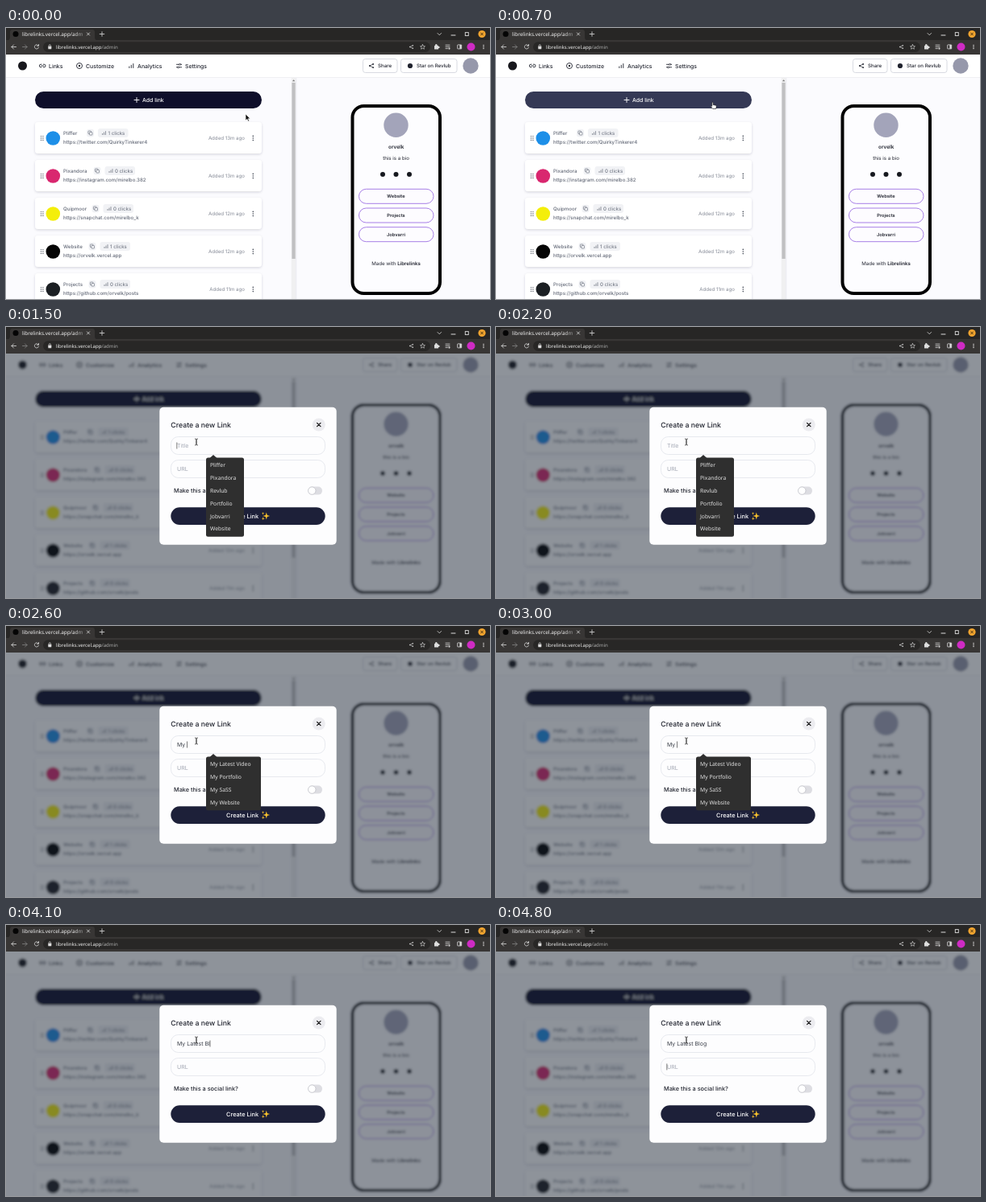
These frames come from a looping animation (600x337 px, 5 s). An HTML page:

```html
<!DOCTYPE html>
<html lang="en">
<head>
<meta charset="utf-8">
<title>Link admin</title>
<style>
  html, body { margin: 0; width: 100%; height: 100%; overflow: hidden; background: #fff; }
  svg { display: block; width: 100%; height: 100%; }
  text { font-family: Inter, sans-serif; text-rendering: geometricPrecision; white-space: pre; }
  .ui { font-family: "Noto Sans", sans-serif; }
</style>
</head>
<body>
<svg id="stage" viewBox="0 0 600 337"></svg>
<script>
const LOOP = 5000, STEP = 100;
const INK = '#20232e', GREY = '#646a78';

const rect = (x, y, w, h, rx, fill, more = '') =>
  `<rect x="${x}" y="${y}" width="${w}" height="${h}" rx="${rx}" fill="${fill}" ${more}/>`;
const dot = (x, y, r, fill, more = '') =>
  `<circle cx="${x}" cy="${y}" r="${r}" fill="${fill}" ${more}/>`;
const text = (x, y, s, size, fill, more = '') =>
  `<text x="${x}" y="${y}" font-size="${size}" fill="${fill}" ${more}>${s}</text>`;
const line = (d, color = INK, w = 0.9, fill = 'none') =>
  `<path d="${d}" fill="${fill}" stroke="${color}" stroke-width="${w}" stroke-linecap="round" stroke-linejoin="round"/>`;
const MEDIUM = 'font-weight="500"', BOLD = 'font-weight="600"', MID = 'text-anchor="middle"';
const outline = (color, w) => `stroke="${color}" stroke-width="${w}"`;

const bars = (x, y, s, color, w) =>
  line(`M${x - s} ${y + s}v${-s * 0.6}M${x} ${y + s}v${-s * 1.3}M${x + s} ${y + s}v${-s * 2}`, color, w);
const shareIcon = (x, y, s, color) =>
  line(`M${x + s} ${y - s}L${x - s} ${y}L${x + s} ${y + s}`, color, 0.7) +
  [[s, -s], [-s, 0], [s, s]].map(([a, b]) => dot(x + a, y + b, s * 0.45, color)).join('');
const cross = (x, y, s, color, w) =>
  line(`M${x - s} ${y - s}l${2 * s} ${2 * s}m0 ${-2 * s}l${-2 * s} ${2 * s}`, color, w);
const kebab = (x, y, gap, r, color) =>
  [-gap, 0, gap].map(d => dot(x, y + d, r, color)).join('');
const sparkle = (x, y, r) => {
  const q = r * 0.22;
  return `<path fill="#fbc52d" d="M${x} ${y - r}L${x + q} ${y - q}L${x + r} ${y}L${x + q} ${y + q}` +
    `L${x} ${y + r}L${x - q} ${y + q}L${x - r} ${y}L${x - q} ${y - q}Z"/>`;
};

function browserBar() {
  const light = '#dedede';
  return rect(0, 0, 600, 15.5, 0, '#272625') +
    rect(0, 15, 600, 18, 0, '#383635') +
    `<path d="M2 15.5Q5 15 5 11V5Q5 2 8 2H107Q110 2 110 5V11Q110 15 113 15.5Z" fill="#383635"/>` +
    dot(12, 7.5, 3.5, '#050505') +
    text(20, 9.9, 'librelinks.vercel.app/adm', 6.4, 'url(#fade)', 'class="ui"') +
    cross(102, 7.5, 1.6, light, 0.8) +
    line('M116.2 7.5h5.6M119 4.7v5.6', light, 0.8) +
    line('M535 6.5l2.3 2.3l2.3-2.3', light, 0.8) +
    line('M552 9h5', light, 1) +
    rect(569.3, 5.6, 4, 4, 0, 'none', outline(light, 0.9)) +
    dot(590, 7.5, 4.6, '#f3a52f') + cross(590, 7.5, 1.4, '#3a2a10', 0.9) +
    line('M12.5 23.5h-5.5m2.5-2.6l-2.6 2.6l2.6 2.6', light, 0.8) +
    line('M20.5 23.5h5.5m-2.5-2.6l2.6 2.6l-2.6 2.6', '#858585', 0.8) +
    line('M40.2 22a2.6 2.6 0 1 0 .2 2.4M40.5 20.4v1.9h-1.9', light, 0.8) +
    rect(46, 17.3, 480, 12.6, 6.3, '#282726') +
    rect(52.3, 22.8, 4, 3.4, 0.5, light) +
    line('M53.2 22.8v-1a1.1 1.1 0 0 1 2.2 0v1', light, 0.7) +
    text(62, 25.7, 'librelinks.vercel.app<tspan fill="#aaa">/admin</tspan>', 6.05, '#f2f2f2', 'class="ui"') +
    shareIcon(502.5, 23.5, 1.8, '#c8c8c8') +
    line('M516.5 20.5l.9 2l2.1.2l-1.6 1.4l.5 2.1l-1.9-1.1l-1.9 1.1l.5-2.1l-1.6-1.4l2.1-.2z', '#c8c8c8', 0.7) +
    rect(531, 21.8, 5, 4.8, 0.7, light) + dot(533.3, 21.3, 1.2, light) + dot(536.4, 24, 1.2, light) +
    line('M545 21.2h5M545 23.4h5M545 25.6h2.5', light, 0.8) + dot(549.5, 25.6, 1.1, light) +
    rect(559.7, 20.9, 5, 5, 0.4, 'none', outline(light, 0.8)) + rect(562.4, 21, 2.2, 4.8, 0, light) +
    dot(576.5, 23.5, 5, '#cf2bc4') +
    kebab(592, 23.5, 2.1, 0.75, light);
}

function nav() {
  const item = (x, s) => text(x, 49.6, s, 6.9, INK, MEDIUM);
  return rect(-20, 10, 640, 51.5, 0, '#fff') + rect(-20, 61, 640, 0.7, 0, '#ebebf0') +
    dot(20.5, 47, 5.5, '#17171c') +
    line('M44 48.8h-.8a1.8 1.8 0 0 1 0-3.6h.8M46.4 45.2h.8a1.8 1.8 0 0 1 0 3.6h-.8M43.8 47h2.8') + item(53, 'Links') +
    dot(91, 47, 3.5, 'none', outline(INK, 0.9)) + dot(91, 47, 1.2, INK) + item(99, 'Customize') +
    bars(155.3, 47, 2.5, INK, 0.9) + item(163, 'Analytics') +
    line('M211.5 45.3h3M216.6 45.3h1M211.5 48.8h1M214.6 48.8h3') +
    dot(215.6, 45.3, 1, 'none', outline(INK, 0.7)) + dot(213.5, 48.8, 1, 'none', outline(INK, 0.7)) +
    item(222, 'Settings') +
    rect(442.5, 38.5, 42.5, 17, 3, '#fff', outline('#cfd1da', 0.8)) + shareIcon(453, 47, 2.1, INK) +
    text(461, 49.2, 'Share', 6.15, INK, MEDIUM) +
    rect(489.5, 38.5, 69.5, 17, 3, '#fff', outline('#cfd1da', 0.8)) + dot(501, 47, 3.1, INK) +
    text(509, 49.2, 'Star on Revlub', 6.15, INK, MEDIUM) +
    dot(576, 47, 9.7, '#9698ab');
}

const CARDS = [
  ['Pliffer', 114, 1, 'twitter.com/QuirkyTinkerer4', 13, '#1d8fe8'],
  ['Pixandora', 122.5, 0, 'instagram.com/mirelbo.382', 13, '#d9276f'],
  ['Quipmoor', 120.5, 0, 'snapchat.com/mirelbo_k', 12, '#f4ee0a'],
  ['Website', 116.5, 1, 'orvelk.vercel.app', 12, '#050505'],
  ['Projects', 116.5, 0, 'github.com/orvelk/posts', 11, '#1b1f23'],
];

function card([name, pill, clicks, url, age, color], i) {
  const copy = pill - 9.5;
  let grip = '';
  for (let k = 0; k < 6; k++) grip += dot(43.5 + (k % 2) * 2.4, 17.6 + (k >> 1) * 2.4, 0.7, '#555b66');
  return `<g transform="translate(0 ${117 + i * 47})">` +
    rect(36, 0, 281, 39, 4, '#fff', 'filter="url(#shadow)"') + grip +
    dot(58.3, 20, 8.8, color) +
    text(71, 16, name, 6.15, GREY, MEDIUM) +
    rect(copy - 4.5, 8.8, 9, 9.6, 3, '#f1f2f5') +
    rect(copy - 2.6, 11, 3.6, 3.6, 0.7, 'none', outline(GREY, 0.6)) +
    rect(copy - 1.1, 12.5, 3.6, 3.6, 0.7, '#f1f2f5', outline(GREY, 0.6)) +
    rect(pill, 8, 37.5, 11, 3, '#f1f2f5') + bars(pill + 7.5, 13.6, 2, GREY, 0.7) +
    text(pill + 12.5, 16, clicks + ' clicks', 6.15, GREY) +
    text(71, 27.3, 'https://' + url, 6.15, GREY, MEDIUM) +
    text(296, 22, `Added ${age}m ago`, 6.15, '#858a96', 'text-anchor="end"') +
    kebab(306.3, 20, 2.6, 0.8, '#444a56') + '</g>';
}

function phone() {
  const button = (s, i) => rect(437.5, 200.3 + i * 23.7, 92.5, 18, 9, '#fdfcff', outline('#a77fe6', 1)) +
    text(483.5, 211.4 + i * 23.7, s, 5.7, INK, BOLD + MID.padStart(21));
  return rect(429.5, 97, 108.5, 233, 14, '#fdfdff', outline('#000', 4)) +
    dot(483.5, 120.8, 15.2, '#a3a4ba') +
    text(483.7, 150, 'orvelk', 6.4, INK, BOLD + ' ' + MID) +
    text(483.5, 163.7, 'this is a bio', 6.15, INK, MID) +
    [467, 483.5, 500].map(x => dot(x, 182, 3, '#17191f')).join('') +
    ['Website', 'Projects', 'Jobvarri'].map(button).join('') +
    text(483.5, 295, `Made with <tspan ${BOLD}>Librelinks</tspan>`, 6.15, INK, MID);
}

function page() {
  return rect(-20, 10, 640, 350, 0, '#fbfbfe') +
    rect(36, 79, 281, 21, 10.5, '#0f0f2a', 'id="add"') +
    line('M159 89.5h6M162 86.5v6', '#fff', 0.9) + text(169, 92, 'Add link', 6.9, '#fff', MEDIUM) +
    CARDS.map(card).join('') +
    rect(353.8, 61.7, 5.6, 300, 0, '#f0f0f1') + rect(354.4, 68, 4.3, 219, 0, '#c0c0c2') +
    `<path d="M354.9 66.2h3.4l-1.7-2z" fill="#777"/>` +
    rect(359.6, 61.7, 0.6, 300, 0, '#e4e4ea') +
    phone() + nav();
}

function modal() {
  return rect(190.3, 99.8, 219.4, 171, 5, '#fdfdfe') +
    text(204.3, 124.6, 'Create a new Link', 8.75, INK, MEDIUM) +
    dot(387.8, 121.5, 8, '#ececf0') + cross(387.8, 121.5, 2.2, '#111', 1.2) +
    [136.5, 165.5].map(y => rect(204.5, y, 191, 22, 9, '#fdfdfe', outline('#dfe1e8', 0.7))).join('') +
    text(212, 150.2, '', 7, '#a3a8b3', 'id="title"') +
    text(212, 179, 'URL', 7, '#a3a8b3') +
    rect(0, 0, 0.6, 8, 0, '#222', 'id="caret"') +
    text(208, 206.4, 'Make this a social link?', 7.3, INK, MEDIUM) +
    rect(374.5, 198.6, 17.5, 10, 5, '#dddde2') + dot(379.3, 203.6, 4.7, '#fff', outline('#b9bac2', 0.7)) +
    rect(204.3, 224.2, 191.4, 21.8, 10.9, '#1d2039') +
    text(273, 237.8, 'Create Link', 7.4, '#fff', MEDIUM) +
    sparkle(322.8, 235, 4.4) + sparkle(318.6, 231.8, 1.9) + sparkle(318.8, 238.2, 2.1);
}

const cursors = {
  arrow: '<path d="M0 0V8L1.9 6.3L3.2 9.1L4.5 8.5L3.2 5.8H5.7Z" fill="#111" stroke="#fff" stroke-width=".6"/>',
  hand: '<path d="M-.7 .2Q0-.6 .7 .2V3L4 3.7Q4.8 4 4.7 5L4.2 8H.2L-2.2 5.2Q-2.2 4.2-.7 4.8Z" fill="#fff" stroke="#111" stroke-width=".6" stroke-linejoin="round"/>',
  beam: line('M-1.6-4Q0-4 0-3V3Q0 4-1.6 4M1.6-4Q0-4 0-3V3Q0 4 1.6 4', '#222', 0.7),
};

const stage = document.getElementById('stage');
stage.innerHTML = `<defs>
  <filter id="blur" filterUnits="userSpaceOnUse" x="-20" y="10" width="640" height="350"><feGaussianBlur stdDeviation="1.7"/></filter>
  <filter id="shadow" x="-5%" y="-20%" width="110%" height="150%"><feDropShadow dx="0" dy="1.2" stdDeviation="1.5" flood-color="#20243c" flood-opacity=".17"/></filter>
  <linearGradient id="fade" gradientUnits="userSpaceOnUse" x1="84" x2="97"><stop stop-color="#f2f2f2"/><stop offset="1" stop-color="#777"/></linearGradient>
  </defs><g id="page">${page()}</g>` +
  rect(0, 33, 600, 304, 0, '#1f2937', 'id="dim" opacity=".5"') + browserBar() +
  `<g id="modal">${modal()}</g><g id="list"></g>` +
  Object.entries(cursors).map(([id, s]) => `<g id="${id}">${s}</g>`).join('');

const $ = id => document.getElementById(id);
const show = (id, on) => $(id).setAttribute('display', on ? 'inline' : 'none');

const OPEN = 800, FOCUS = 1400, SUGGEST = 1500, TAB = 4600;
const TYPED = 'My Latest Blog';
const KEYS = [2400, 2500, 2600, 3100, 3300, 3400, 3500, 3600, 3600, 3800, 4000, 4100, 4200, 4300];
const RECENT = ['Pliffer', 'Pixandora', 'Revlub', 'Portfolio', 'Jobvarri', 'Website'];
const MINE = ['My Latest Video', 'My Portfolio', 'My SaSS', 'My Website'];
const PATH = [[0, 297, 107], [600, 268.5, 92.5], [1000, 268.5, 92.5], [1300, 236, 143]];

function pointer(t) {
  const next = PATH.findIndex(p => p[0] > t);
  if (next < 0) return PATH[PATH.length - 1].slice(1);
  const [a, b] = [PATH[next - 1], PATH[next]];
  const k = (t - a[0]) / (b[0] - a[0]), e = k * k * (3 - 2 * k);
  return [a[1] + (b[1] - a[1]) * e, a[2] + (b[2] - a[2]) * e];
}

function suggestions(items) {
  if (!items.length) return '';
  const width = items[0] === RECENT[0] ? 47 : 68;
  return rect(248, 162.6, width, 3.4 + 15.8 * items.length, 2.5, '#2f2f2f') +
    '<path d="M252.5 163l4.5-4l4.5 4z" fill="#2f2f2f"/>' +
    items.map((s, i) => text(253, 174.4 + i * 15.8, s, 6.8, '#e3e3e3', 'class="ui"')).join('');
}

function draw(t) {
  const open = t >= OPEN;
  const [x, y] = pointer(t);
  const hover = !open && y < 100;
  $('add').setAttribute('fill', hover ? '#353955' : '#0f0f2a');
  if (open) $('page').setAttribute('filter', 'url(#blur)');
  else $('page').removeAttribute('filter');
  show('dim', open);
  show('modal', open);
  const scale = t < OPEN + STEP ? 0.993 : 1;
  $('modal').setAttribute('transform', `translate(300 185.3) scale(${scale}) translate(-300 -185.3)`);
  $('modal').setAttribute('opacity', scale < 1 ? 0.98 : 1);

  const count = KEYS.filter(k => k <= t).length;
  const value = TYPED.slice(0, count);
  const title = $('title');
  title.textContent = value || 'Title';
  title.setAttribute('fill', value ? '#3c404a' : '#a3a8b3');

  const inUrl = t >= TAB;
  const last = inUrl ? TAB : count ? KEYS[count - 1] : FOCUS;
  show('caret', t >= FOCUS && Math.floor((t - last) / 500) % 2 === 0);
  const offset = value && !inUrl ? title.getComputedTextLength() : -0.4;
  $('caret').setAttribute('x', 212 + offset);
  $('caret').setAttribute('y', inUrl ? 172.4 : 143.5);

  const items = t < SUGGEST || inUrl ? []
    : value ? MINE.filter(s => s.startsWith(value)) : RECENT;
  $('list').innerHTML = suggestions(items);

  const kind = hover ? 'hand' : open && y > 136 ? 'beam' : 'arrow';
  for (const id in cursors) show(id, id === kind);
  $(kind).setAttribute('transform', `translate(${x} ${y})`);
}

const start = performance.now();
function tick() {
  const t = (performance.now() - start) % LOOP;
  draw(Math.floor(t / STEP) * STEP);
  requestAnimationFrame(tick);
}
tick();
</script>
</body>
</html>
```
